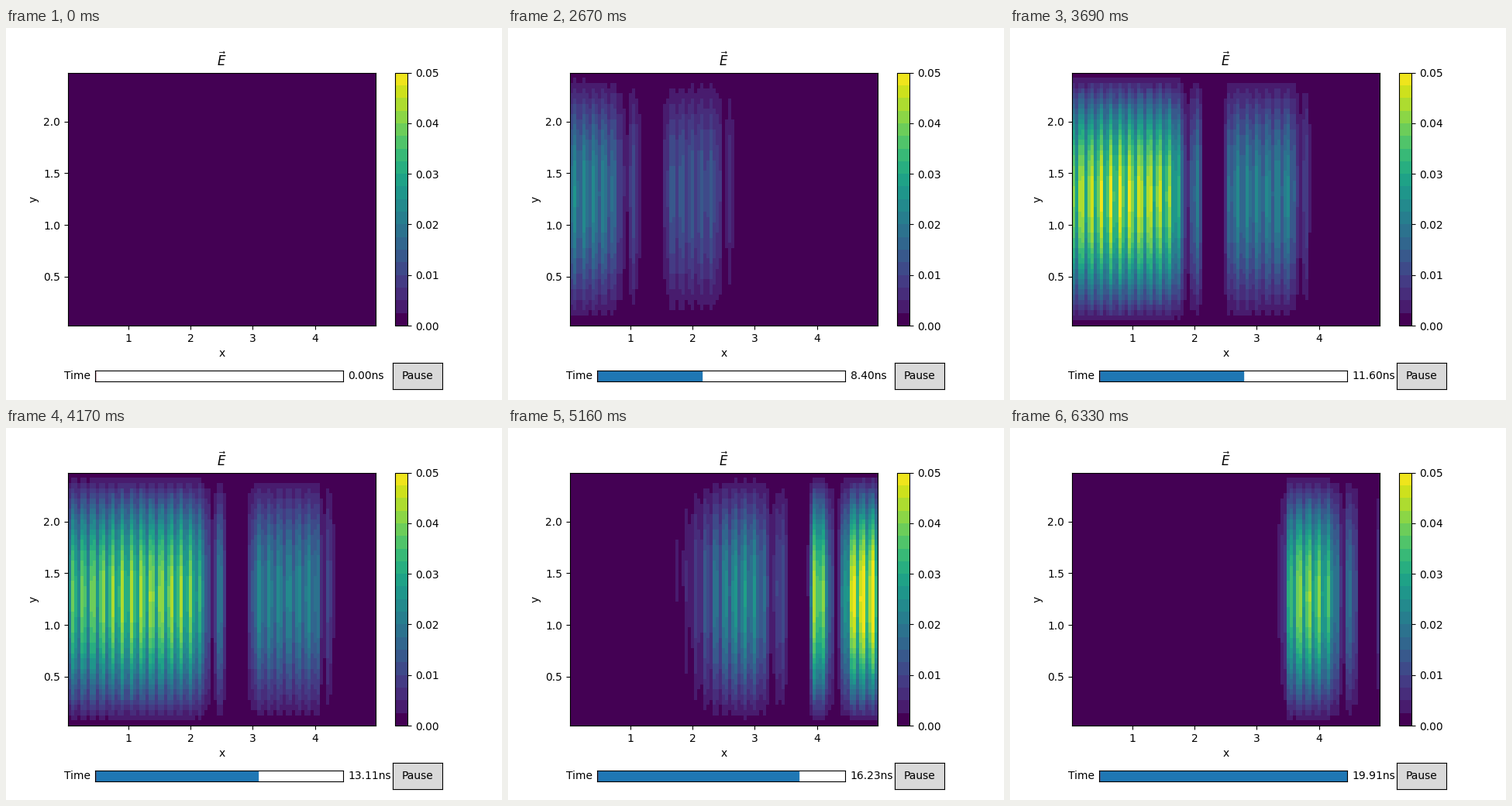
Animation, 640 px wide and 480 px high, one loop 6360 ms. Source, as a matplotlib script:

```python
import numpy as np
import matplotlib.pyplot as plt
from matplotlib.animation import FuncAnimation
from matplotlib.colors import BoundaryNorm, ListedColormap
from matplotlib.patches import Rectangle

FRAMES = 212
T_END = 20            # ns
SPEED = 6.0           # grid columns travelled per ns
DRIFT = 0.6           # how far the ripples lag behind, columns per ns
RIPPLE = 3.15         # ripple spacing, columns
LEVELS = 20

xs = np.arange(0.025, 5, 0.05)
ys = np.arange(0.025, 2.5, 0.05)
cols = np.arange(len(xs) - 1)
phase = np.pi * np.arange(0.5, len(ys) - 1) / (len(ys) - 1)
mode = np.sin(phase)[:, None]
skew = -0.0006 * np.sin(2 * phase)[:, None]


def sigmoid(v):
    return 1 / (1 + np.exp(-np.clip(v, -50, 50)))


def lobe(s, a, b):
    return np.sin(np.pi * np.clip((s - a) / (b - a), 0, 1))


def head_pulse(s, t):
    """Short pulse that runs ahead and piles up at the right wall."""
    amp = np.interp(t, [5, 6.5, 10, 15], [0, 0.0038, 0.019, 0.021])
    front = np.interp(t, [6.5, 10], [7.5, -2])
    body = sigmoid((s - front) / 0.5) * sigmoid((20.3 - s) / 0.6)
    pulse = np.maximum(body, 0.45 * lobe(s, front - 5, front - 0.5))
    dist = cols[-1] - cols
    standing = 2.1 * np.minimum(1, 1.6 * np.abs(np.cos(np.pi * dist / 26)))
    standing[dist > 21] = 1
    mix = np.clip((t - 14.6) / 1.4, 0, 1)
    return amp * pulse * (1 + mix * (standing - 1))


def main_pulse(s, t):
    """Long pulse with a small leading lobe; returns amplitude and tail cut."""
    amp = np.interp(t, [7, 10, 13.1, 14.5, 16.2, 20],
                    [0, 0.044, 0.037, 0.037, 0.025, 0.037])
    end = np.interp(t, [13.1, 14.5, 16.2, 20], [90, 64, 53, 51])
    width = np.interp(t, [13.1, 14.5, 16.2, 20], [8, 12, 4, 0.8])
    rise = 1 - np.exp(-np.maximum(s - 32.7, 0) / 3)
    tail = sigmoid((end - s) / width)
    return amp * (rise * tail + 0.48 * lobe(s, 27.5, 33)), tail


def field(t):
    s = SPEED * t - cols        # distance behind the light front
    main, tail = main_pulse(s, t)
    ripple = np.cos(2 * np.pi * (s - DRIFT * (t - 10)) / RIPPLE)
    contrast = 0.24 + 0.3 * (1 - tail) * (s > 33)
    amp = (head_pulse(s, t) + main) * (1 + contrast * ripple)
    e = amp * mode + skew * np.minimum(1, amp / 0.002)
    return np.clip(e, 0, 0.0499)


shades = (np.arange(LEVELS) + 0.5) / LEVELS
shades[0] = 0
cmap = ListedColormap(plt.get_cmap("viridis")(shades))
norm = BoundaryNorm(np.linspace(0, 0.05, LEVELS + 1), LEVELS)

fig, ax = plt.subplots(figsize=(6.4, 4.8), dpi=100)
fig.subplots_adjust(bottom=0.2)
mesh = ax.pcolormesh(xs, ys, field(0), cmap=cmap, norm=norm, shading="flat")
cbar = fig.colorbar(mesh, ax=ax, ticks=np.linspace(0, 0.05, 6), format="%.2f")
cbar.minorticks_off()
ax.set(title=r"$\vec{E}$", xlabel="x", ylabel="y",
       xticks=[1, 2, 3, 4], yticks=[0.5, 1, 1.5, 2])


def panel(rect, color):
    a = fig.add_axes(rect, facecolor=color)
    a.set(xticks=[], yticks=[], xlim=(0, 1), ylim=(0, 1))
    return a


slider = panel([0.18, 0.05, 0.5, 0.03], "white")
bar = slider.add_patch(Rectangle((0, 0), 0, 1, color="C0", zorder=1))
slider.axvline(0, color="r", lw=1, zorder=1)
slider.text(-0.02, 0.5, "Time", ha="right", va="center")
clock = slider.text(1.02, 0.5, "", ha="left", va="center")

button = panel([0.78, 0.03, 0.1, 0.07], "0.85")
button.text(0.5, 0.5, "Pause", ha="center", va="center")


def update(i):
    t = T_END * i / FRAMES
    mesh.set_array(field(t))
    bar.set_width(t / T_END)
    clock.set_text(f"{t:.2f}ns")
    return mesh, bar, clock


anim = FuncAnimation(fig, update, frames=FRAMES, interval=30, repeat=True)
plt.show()
```
